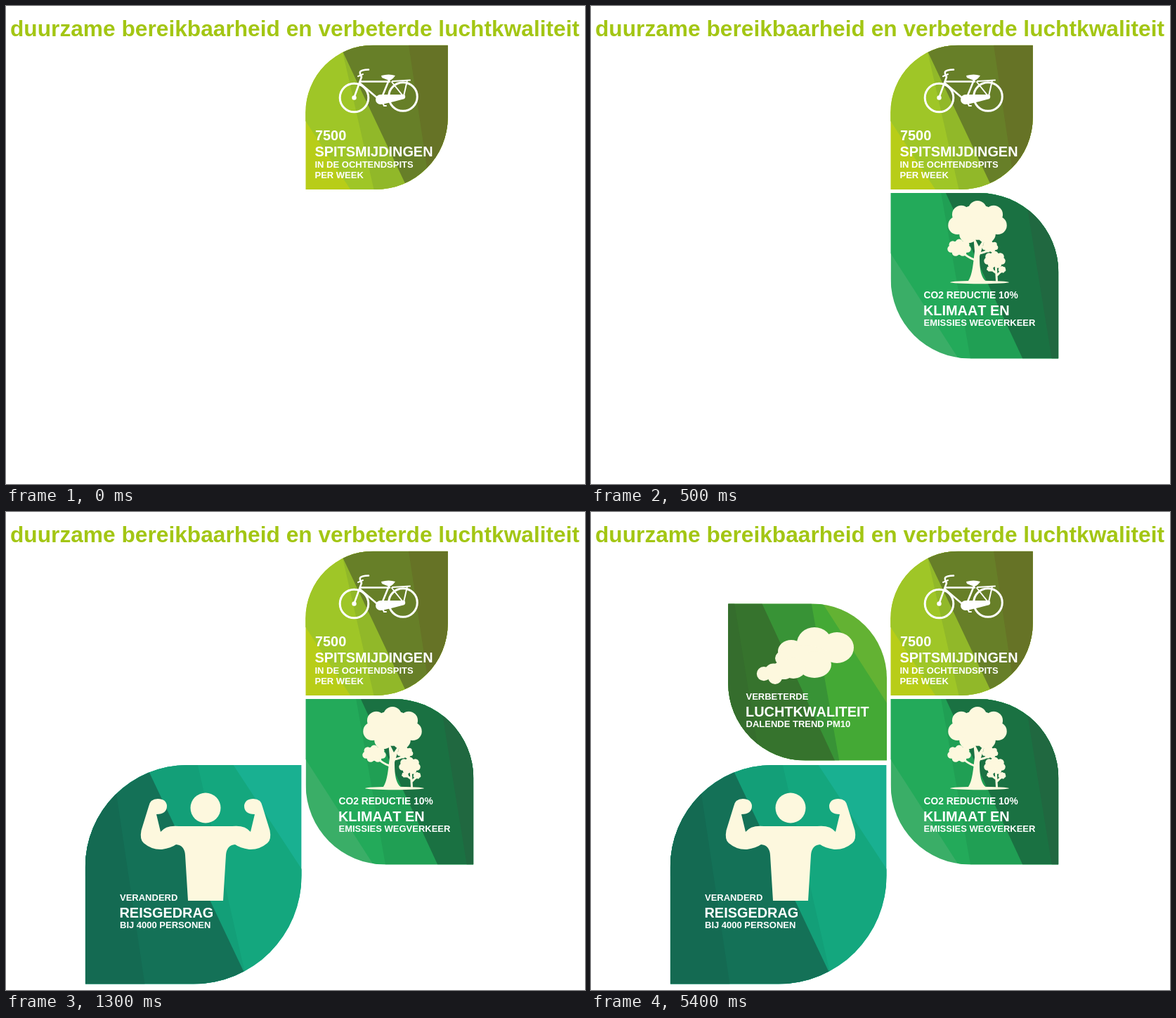
Recreate the animation shown at these times as an HTML page with a canvas. Size 824x680 px, loop 8 s.

```html
<!DOCTYPE html>
<html lang="nl">
<head>
<meta charset="utf-8">
<title>Duurzame bereikbaarheid</title>
<style>
  html, body { margin: 0; width: 100%; height: 100%; overflow: hidden; background: #fff; }
  canvas { display: block; width: 824px; height: 680px; }
</style>
</head>
<body>
<canvas id="stage"></canvas>
<script>
const LOOP = 8000, STEP = 500, TAU = Math.PI * 2;
const CREAM = '#fdf8de', WHITE = '#fff';
const BIG = 19.9, SMALL = 13;
const canvas = document.getElementById('stage');
const ratio = window.devicePixelRatio || 1;
canvas.width = 824 * ratio;
canvas.height = 680 * ratio;
const ctx = canvas.getContext('2d');
ctx.scale(ratio, ratio);

function oval(color, x, y, rx, ry = rx) {
  ctx.fillStyle = color;
  ctx.beginPath();
  ctx.ellipse(x, y, rx, ry, 0, 0, TAU);
  ctx.fill();
}

function fill(color, d) {
  ctx.fillStyle = color;
  ctx.fill(new Path2D(d));
}

function stroke(color, width, d) {
  ctx.strokeStyle = color;
  ctx.lineWidth = width;
  ctx.lineCap = ctx.lineJoin = 'round';
  ctx.stroke(new Path2D(d));
}

function text(str, x, y, size, color = WHITE) {
  ctx.font = `bold ${size}px "Liberation Sans", Arial, sans-serif`;
  ctx.fontKerning = 'none';
  ctx.fillStyle = color;
  ctx.fillText(str, x, y);
}

// A small line, a big one and a small one, evenly spaced in every leaf.
function label(x, y, top, middle, bottom, topSize = SMALL) {
  text(top, x, y, topSize);
  text(middle, x - 0.5, y + 24, BIG);
  text(bottom, x, y + 39, SMALL);
}

// Band edges as [top, bottom] fractions of the width; each band covers all to its right.
const STEEP = [[-0.35, 0.315], [0.25, 0.48], [0.24, 0.72], [0.725, 0.876]];
const WIDE = [[-0.233, 0.403], [0.3, 0.475], [0.328, 0.786], [0.8, 0.96]];

function leaf({ box: [x, y, w, h], radii, turned, edges, colors }) {
  ctx.save();
  ctx.beginPath();
  ctx.roundRect(x, y, w, h, radii);
  ctx.clip();
  ctx.translate(x + w / 2, y + h / 2);
  if (turned) ctx.rotate(Math.PI);
  ctx.translate(-w / 2, -h / 2);
  ctx.fillStyle = colors[0];
  ctx.fillRect(0, 0, w, h);
  edges.forEach(([top, bottom], i) =>
    fill(colors[i + 1], `M${top * w} 0H${w}V${h}H${bottom * w}Z`));
  ctx.restore();
}

function bike() {
  for (const [x, y] of [[495.5, 130.5], [565, 129]]) {
    ctx.strokeStyle = WHITE;
    ctx.lineWidth = 3;
    ctx.beginPath();
    ctx.arc(x, y, 20.3, 0, TAU);
    ctx.stroke();
    oval(WHITE, x, y, 3.2);
  }
  stroke(WHITE, 2.6, 'M516 90.5C502 91 502 94 506 101L495.5 130M505 107.5H546M504 110L531 133M546 103L534 132');
  stroke(WHITE, 2, 'M501 100L508 97M550 107L575 105.5M549 108L565 128M571 106L566 128M534 133L538 142H541');
  oval(WHITE, 533, 133, 7);
  fill(WHITE, 'M533 126H566L567 132L552 136L535 140Z');
  fill(WHITE, 'M534 99Q545 96 554 99Q549 106 545 106L535 102Z');
}

// Round puffs spread evenly around an oval heart.
function crown(x, y, rx, ry, puffs = 7) {
  const r = ry * 0.42;
  oval(CREAM, x, y, rx * 0.8, ry * 0.8);
  for (let i = 0; i < puffs; i++) {
    const a = i / puffs * TAU - TAU / 4;
    oval(CREAM, x + Math.cos(a) * (rx - r), y + Math.sin(a) * (ry - r), r);
  }
}

function trees() {
  crown(550, 308, 42.5, 31);
  crown(524, 344, 17, 12.5);
  crown(568, 342.5, 11.5, 8.5);
  crown(574.5, 361, 15.5, 12.5);
  crown(568, 374, 5, 4);
  crown(585, 375, 5.5, 5);
  oval(CREAM, 553, 393, 42, 2.2);
  fill(CREAM, 'M544 326L546 349C544 365 543 382 537 391L529 394H567C555 390 553 376 553 356L562 327L552 342Z');
  stroke(CREAM, 3, 'M526 348Q536 358 546 361M568 346Q560 351 552 352M576 366L577.5 391M570 375L577 380M584 377L578 383');
}

function man() {
  oval(CREAM, 284, 421, 21.5);
  for (const side of [1, -1]) {
    ctx.save();
    ctx.translate(284, 0);
    ctx.scale(side, 1);
    fill(CREAM, `M1 447H-38Q-56 445 -64 455L-70 430Q-55 430 -55 418Q-56 408 -68 408Q-79 408 -81 419
      L-91.5 453Q-94 466 -88 471Q-76 481 -62 480Q-49 478 -42 473Q-30 474 -29 488L-25 553H1Z`);
    ctx.restore();
  }
}

function cloud() {
  oval(CREAM, 318, 187, 25, 23);
  oval(CREAM, 350, 193, 24, 22);
  oval(CREAM, 285, 198, 19, 16);
  oval(CREAM, 302, 208, 40, 18);
  oval(CREAM, 318, 217, 24, 19);
  // Puffs shrink towards the trailing lower left.
  for (let i = 0; i < 4; i++) {
    oval(CREAM, 288 - i * 14, 222 + i * 2.7, 18 - i * 2.6, 15 - i * 1.6);
  }
  oval(CREAM, 262, 235, 10);
}

const leaves = [
  {
    box: [426.3, 55.7, 202.5, 205.3], radii: [96, 0, 103, 0], edges: STEEP,
    colors: ['#b8cd18', '#9fc627', '#91b829', '#677f28', '#667326'],
    art() {
      bike();
      text('7500', 440, 191, BIG);
      text('SPITSMIJDINGEN', 439.5, 214, BIG);
      text('IN DE OCHTENDSPITS', 439.5, 229.5, SMALL);
      text('PER WEEK', 439.5, 245, SMALL);
    }
  },
  {
    box: [426.6, 266, 238.7, 235.5], radii: [0, 113], edges: WIDE,
    colors: ['#3aae67', '#23aa5a', '#209f54', '#1a7142', '#206840'],
    art() {
      trees();
      label(473.5, 416, 'CO2 REDUCTIE 10%', 'KLIMAAT EN', 'EMISSIES WEGVERKEER', 13.8);
    }
  },
  {
    box: [112.8, 360, 307.8, 311.5], radii: [145, 0, 154, 0], edges: STEEP, turned: true,
    colors: ['#19b091', '#14a77e', '#139f78', '#147157', '#146a52'],
    art() {
      man();
      label(162, 553, 'VERANDERD', 'REISGEDRAG', 'BIJ 4000 PERSONEN');
    }
  },
  {
    box: [195.2, 130.5, 225.8, 223], radii: [0, 106, 0, 110], edges: WIDE, turned: true,
    colors: ['#63b233', '#44a935', '#389336', '#36732d', '#356d2d'],
    art() {
      cloud();
      label(220.5, 267, 'VERBETERDE', 'LUCHTKWALITEIT', 'DALENDE TREND PM10');
    }
  }
];

function draw(count) {
  ctx.fillStyle = WHITE;
  ctx.fillRect(0, 0, 824, 680);
  text('duurzame bereikbaarheid en verbeterde luchtkwaliteit', 6, 43, 31.7, '#a3c614');
  for (const item of leaves.slice(0, count)) {
    leaf(item);
    item.art();
  }
}

const start = performance.now();
let shown = 0;

function tick() {
  const t = (performance.now() - start) % LOOP;
  const count = Math.min(leaves.length, 1 + Math.floor(t / STEP));
  if (count !== shown) draw(shown = count);
  requestAnimationFrame(tick);
}
tick();
</script>
</body>
</html>
```
